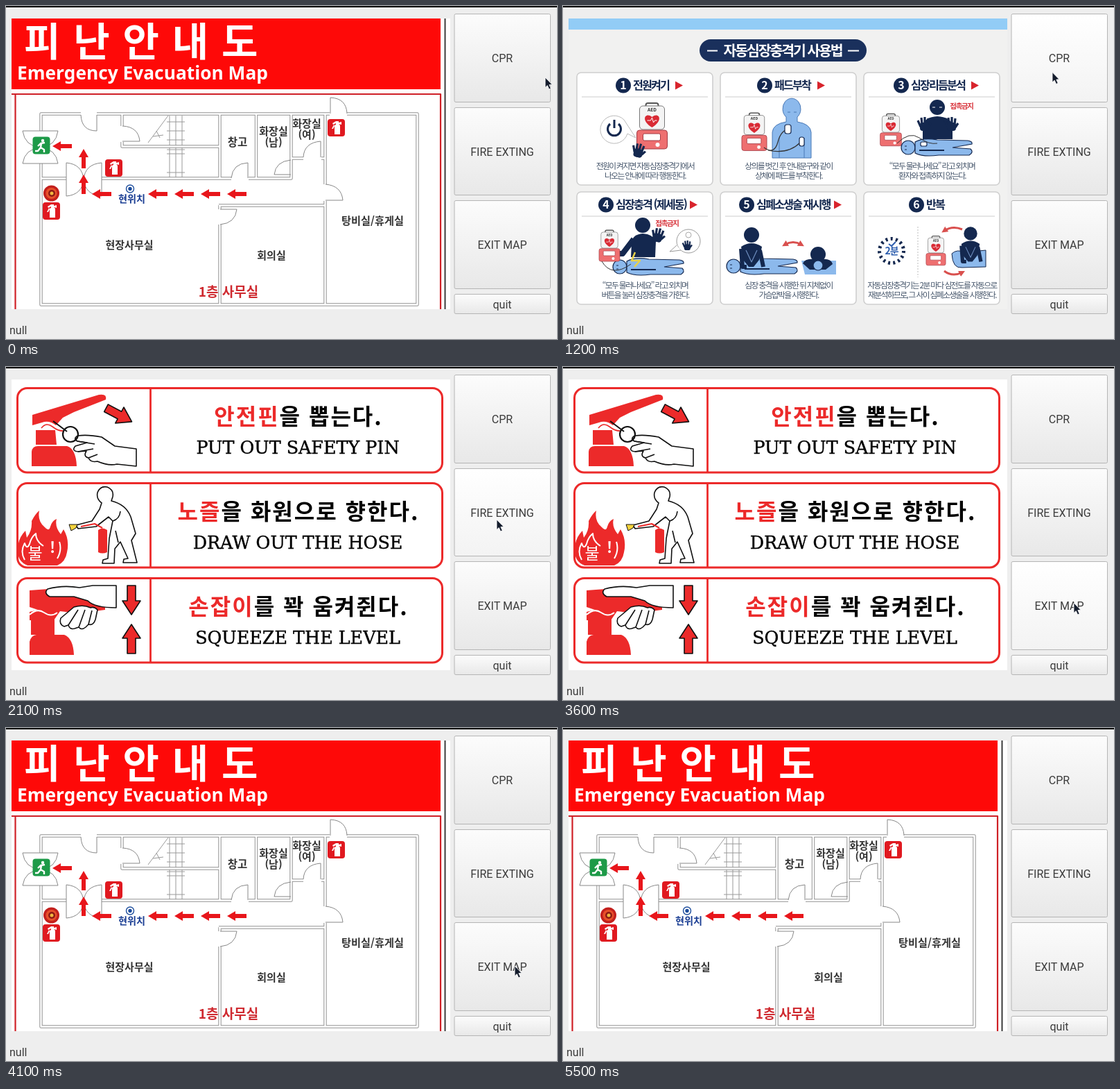
Write an HTML page that moves like this. It is 795 px wide and 480 px high and loops after 5.8 s.

```html
<!DOCTYPE html>
<html lang="ko">
<meta charset="utf-8">
<style>
html, body { margin: 0; width: 100%; height: 100%; overflow: hidden; background: #eee }
svg { display: block }
.ko { font-family: "Noto Sans CJK KR", "Noto Sans CJK JP", sans-serif; text-anchor: middle }
.ui { font: 16px Roboto, sans-serif; fill: #3c3c3c }
.serif { font: 25.4px "DejaVu Serif", serif; text-anchor: middle; stroke: #000; stroke-width: .4 }
</style>
<svg id="stage" width="795" height="480" viewBox="0 0 795 480"></svg>
<script>
const RED = '#ec2a2a', NAVY = '#14284f', SKY = '#8cb9ec';
const stage = document.getElementById('stage');

const path = (d, fill = 'none', stroke = 'none', width = 1) =>
  `<path d="${d}" fill="${fill}" stroke="${stroke}" stroke-width="${width}" stroke-linejoin="round"/>`;
const rect = (x, y, w, h, fill, rx = 0, more = '') =>
  `<rect x="${x}" y="${y}" width="${w}" height="${h}" rx="${rx}" fill="${fill}" ${more}/>`;
const circle = (x, y, r, fill, more = '') => `<circle cx="${x}" cy="${y}" r="${r}" fill="${fill}" ${more}/>`;
const text = (x, y, size, str, more = '') =>
  `<text x="${x}" y="${y + size * .37}" font-size="${size}" ${more}>${str}</text>`;
const at = (x, y, body, more = '') => `<g transform="translate(${x} ${y}) ${more}">${body}</g>`;

// Evacuation map
const doorArcs = 'M108 157Q109 180 131 180V157 M168 173Q191 174 193 195H168 M468 155V132Q491 133 492 155' +
  'M325 248Q327 227 349 226V248 M411 222Q389 224 387 243H411 M429 218Q430 197 454 195V218' +
  'M461 257Q484 259 486 280H461 M309 293H333Q331 313 309 315' +
  'M50 180H24Q27 202 50 204Q27 206 24 227H75Q72 206 50 204Q72 202 75 180Z' +
  'M87 226Q110 228 112 250Q110 272 87 274ZM138 226Q114 228 112 250Q114 272 138 274Z';
const walls = 'M108 155.5H50.5V180 M50.5 227V430.5H593.5V155.5H492 M131 155.5H467 M167.5 156V173' +
  'M167.5 196V202.5H308 M50 248.5H87 M138 248.5H325 M308.5 156V248 M350 248.5H411.5V219.5H429 M455 219.5H460' +
  'M361 156V248 M411.5 156V220 M460.5 156V257 M460.5 281V430 M460 287.5H307 M308.5 287V293 M308.5 315V430';
const stairs = 'M205 197L234 158 M217 180L222 190 M212 188L227 186 M236 158V247 M245 158V247 M254 158V247' +
  [167, 180, 193, 207, 213, 240].map(y => `M232 ${y}H258`).join('');
const mapArrow = (x, y, turn = 0) => at(x, y, path('M0 0L12-7V-3H28V3H12V7Z', '#e8161b'), `rotate(${turn})`);
const extinguisher = (x, y) => at(x, y, rect(0, 0, 25, 25, '#e01920', 4) +
  path('M10 10Q10 8 12 8V6L8 8L7 6L12 3H16V5L20 4V8L16 7Q18 8 18 10V22H10ZM9 8L6 14H8L10 10Z', '#fff'));
const map = rect(8, 18, 633, 419, '#fff') + rect(8, 18, 619, 102, '#fe0908') +
  path('M633.5 18V437', '', '#3a3a3a', 2) + path('M8 127H627V437M13.5 128V437', 'none', '#cf2027', 2.2) +
  `<text x="26" y="72" font-size="57" font-weight="700" letter-spacing="18.8" fill="#fff" text-anchor="start">피난안내도</text>
  <text x="16" y="106" font-size="26.3" font-weight="700" fill="#fff" text-anchor="start" font-family="Noto Sans, sans-serif">Emergency Evacuation Map</text>` +
  path(stairs, 'none', '#999') + path(walls, 'none', '#929292', 4.4) + path(walls, 'none', '#fff', 2.4) +
  path(doorArcs, 'none', '#888') +
  mapArrow(67, 202) + mapArrow(124, 271) + [205, 243, 281, 319].map(x => mapArrow(x, 271)).join('') +
  mapArrow(112, 206, 90) + mapArrow(112, 243, 90) +
  extinguisher(143, 221) + extinguisher(464, 163) + extinguisher(53, 283) +
  rect(38.5, 188.5, 25, 25, '#1d9a48', 4) + circle(53, 194, 2.2, '#fff') +
  path('M56 197L50 198L46 202M51 198L50 204L55 207V211M50 204L46 209H42', 'none', '#fff', 2.4) +
  circle(65.5, 270, 11.5, '#c3201d') + circle(65.5, 270, 8, '#e8502a') + circle(66, 270, 5, '#8c1a14') + circle(66, 270, 2.5, '#f0b840') +
  circle(179, 263.5, 5.5, '#fff', 'stroke="#1c4c9c" stroke-width="1.4"') + circle(179, 263.5, 2.7, '#1c4c9c') +
  `<g font-weight="700" fill="#333">` + text(334, 196, 15.5, '창고') + text(386, 180, 15, '화장실') + text(386, 196, 15, '(남)') +
  text(434, 169, 15, '화장실') + text(434, 185, 15, '(여)') + text(529, 309, 15.2, '탕비실/휴게실') +
  text(178, 344, 15, '현장사무실') + text(383, 359, 15, '회의실') +
  text(321, 412, 19, '1층 사무실', 'fill="#cf2a30"') + text(181.5, 278, 14.2, '현위치', 'fill="#1c3f94"') + '</g>';

// Defibrillator guide
const line = `stroke="${NAVY}" stroke-width="1.2"`;
const aed = (x, y, k) => at(x, y, rect(-9, -35, 18, 8, 'none', 3, 'stroke="#555" stroke-width="2"') +
  rect(-18, -31, 36, 34, '#f4f4f4', 5, 'stroke="#777"') + text(0, -25, 6.5, 'AED', 'fill="#333" font-weight="700"') +
  path('M0 0C-18-11-9-23 0-15C9-23 18-11 0 0Z', '#d92b35') + path('M-7-10H-2L0-14L2-7L4-10H7', 'none', '#fff') +
  rect(-22, 4, 44, 27, '#ee6f70', 4, 'stroke="#a33b45"') + rect(-13, 9, 25, 10, '#fff', 2, 'stroke="#a33b45"') +
  circle(8, 25, 3, '#fff'), `scale(${k})`);
const patient = (x, y) => at(x, y, `<g fill="${SKY}" ${line}>` +
  `<circle r="10"/><path d="M10-8Q22-15 42-11L86-10Q93-9 92-5L64 0L90 2Q95 7 88 11H44Q22 14 10 8Z"/><path d="M16 4H52" stroke-width="2"/></g>` +
  path('M-5-2H-2M-5 3H-2', 'none', NAVY));
const rescuer = (x, y, k = 1) => at(x, y, circle(0, 0, 11, NAVY) +
  path('M-15 17Q0 7 15 17L11 36L3 46H-4L-12 36Z', NAVY) + path('M-8 22L0 39L8 22', 'none', '#6f8fc0', 1.2) +
  path('M-15 20L-13 46H-7M12 22L17 46', 'none', NAVY, 6), `scale(${k})`);
const hand = (x, y, turn = 0) => at(x, y, path('M0 10V-2M-5 4L-9-5M-3 0L-4-9M1 0L1-10M5 1L6-8M6 5L10-1', 'none', NAVY, 3.2) +
  rect(-6, -2, 13, 12, NAVY, 4), `rotate(${turn})`);
const curve = (d, both = true) => `<path d="${d}" fill="none" stroke="#d9504e" stroke-width="3" marker-end="url(#tip)" ${both ? 'marker-start="url(#tip)"' : ''}/>`;
const noTouch = (x, y) => text(x, y, 10.5, '접촉금지', 'fill="#d8343c" font-weight="700" letter-spacing="-1.3"');
const cards = [
  ['전원켜기', 87, 162, '전원이 켜지면 자동심장충격기에서', '나오는 안내에 따라 행동한다.'],
  ['패드부착', 291, 367, '상의를 벗긴 후 안내문구와 같이', '상체에 패드를 부착한다.'],
  ['심장리듬분석', 488, 589, '“모두 물러나세요” 라고 외치며', '환자와 접촉하지 않는다.'],
  ['심장충격 (제세동)', 62, 183, '“모두 물러나세요” 라고 외치며', '버튼을 눌러 심장충격을 가한다.'],
  ['심폐소생술 재시행', 265, 391, '심장 충격을 시행한 뒤 지체없이', '가슴압박을 시행한다.'],
  ['반복', 510, 0, '자동심장충격기는 2분 마다 심전도를 자동으로', '재분석하므로, 그 사이 심폐소생술을 시행한다.'],
].map(([title, cx, tri, a, b], i) => {
  const x = 20 + i % 3 * 207, y = i < 3 ? 96 : 268, head = y + 18.5;
  const small = 'fill="#46566b" font-weight="500" letter-spacing="-1.65"';
  return rect(x, y, 196, 162, '#fff', 6, 'stroke="#cfcfcf" stroke-width="1.6"') +
    path(`M${x + 7} ${y + 35}h182`, 'none', '#ccc') + circle(cx, head, 11, NAVY) +
    text(cx, head, 16, i + 1, 'fill="#fff" font-weight="900"') +
    text(cx + 14, head, 16.2, title, `fill="${NAVY}" font-weight="700" letter-spacing="-1.9" text-anchor="start"`) +
    (tri ? path(`M${tri} ${head - 6}l11 6l-11 6Z`, '#d8242c') : '') +
    text(x + 98.5, y + 134.5, 11.8, a, small) + text(x + 98.5, y + 149, 11.8, b, small);
}).join('');
const guide = rect(8, 18, 633, 419, '#f1f1f0') + rect(8, 18, 633, 16, '#92ccf6') +
  rect(197, 48, 241, 32, '#1a305c', 16) + path('M208 64.5H223M411 64.5H427', 'none', '#fff', 2) +
  text(317, 64.5, 20.5, '자동심장충격기 사용법', 'fill="#fff" font-weight="700" letter-spacing="-2.1"') + cards +
  // 1: power on
  aed(128.5, 175, 1) + path('M88 164A20 20 0 1 0 93 184L105 190Z', '#fff', '#bbb') +
  path('M68 170A9.5 9.5 0 1 0 80 170M74 164V176', 'none', NAVY, 3) + hand(109, 208, 15) +
  // 2: pads
  aed(276, 183, .82) + path('M302 219V182Q303 170 322 167V160A13 15 0 1 1 338 160V167Q357 170 358 182V219Z', SKY, '#4978b5') +
  path('M312 219V190M348 219V190M324 153H328M333 153H337', 'none', '#4978b5') +
  path('M290 204Q305 215 310 196T328 178M296 208Q325 214 342 197', 'none', '#333', 1.2) +
  rect(320, 171, 9, 13, '#fff', 3, line) + rect(341, 189, 7, 13, '#fff', 3, line) +
  // 3: analysis
  aed(473, 180, .7) + circle(540, 146, 11, NAVY) + path('M519 192V172Q522 160 540 159Q559 160 562 172V192Z', NAVY) +
  hand(521, 170) + hand(560, 170) + path('M533 146H537M543 146H547', 'none', '#fff') +
  patient(498, 204) + path('M482 198Q500 180 514 190T540 198', 'none', '#333') + rect(516, 196, 9, 6, '#fff', 2, line) + noTouch(575, 144) +
  // 4: shock
  path('M98 362L99 340Q101 329 115 328Q130 329 134 339L133 362Z', NAVY) + circle(115, 316, 11, NAVY) +
  path('M102 336L86 357L74 357M130 338L137 330', 'none', NAVY, 8) + hand(137, 330, 15) + patient(82, 376) + aed(67, 347, .68) +
  path('M56 368Q70 392 98 372', 'none', '#333') + path('M104 355L99 367H111L103 376', 'none', '#e8d24a', 2.5) +
  circle(181, 339, 17, '#fff', 'stroke="#999"') + path('M164 345L154 354L170 352', '#fff', '#999') +
  circle(181, 330, 4, '#fff', 'stroke="#aaa"') + at(179, 345, hand(0, 0), 'scale(.7)') + noTouch(150, 313) +
  // 5: compressions
  patient(246, 375) + rescuer(272, 330) + curve('M320 344Q332 337 344 344') +
  path('M344 367H394V387H349Z', SKY) + circle(368, 358, 11, NAVY) + path('M346 371Q350 362 368 366Q386 362 389 372L379 380H356Z', NAVY) + circle(368, 374, 7, SKY, line) +
  // 6: repeat
  circle(474, 353, 17.5, 'none', `stroke="${NAVY}" stroke-width="5" stroke-dasharray="3 4.33"`) +
  text(474, 353, 14, '2분', `fill="#2d5eae" font-weight="700" letter-spacing="-1"`) +
  path('M470 343L474 346L480 340', 'none', '#2d5eae', 2) +
  `<path d="M512 318V391" stroke="#bbb" stroke-dasharray="2 2"/>` + aed(538, 354, .64) +
  path('M561 357Q568 350 580 355L610 352V376L576 377Q562 379 561 357Z', SKY, NAVY) + rescuer(588, 328, .88) +
  curve('M576 322Q562 316 550 324', false) + curve('M550 382Q562 391 576 384', false);

// Extinguisher instructions
const ink = (d, fill = '#fff', w = 1.6) => path(d, fill, '#111', w);
const bigArrow = (x, y, turn) => at(x, y, ink('M-6-21H6V1H13L0 21L-13 1H-6Z', RED), `rotate(${turn})`);
const rows = [
  ['안전핀', '을 뽑는다.', 'PUT OUT SAFETY PIN'],
  ['노즐', '을 화원으로 향한다.', 'DRAW OUT THE HOSE'],
  ['손잡이', '를 꽉 움켜쥔다.', 'SQUEEZE THE LEVEL'],
].map(([key, rest, english], i) => {
  const y = 30.5 + i * 137;
  return rect(16.5, y, 613, 121.5, '#fff', 14, `stroke="${RED}" stroke-width="3"`) + path(`M208.5 ${y}v122`, 'none', RED, 2.8) +
    `<text x="422" y="${y + 52}" font-size="32" font-weight="700" letter-spacing="2"><tspan fill="${RED}">${key}</tspan>${rest}</text>
    <text class="serif" x="421" y="${y + 94.5}">${english}</text>`;
}).join('');
const steps = rect(8, 18, 633, 419, '#fff') + rows +
  // 1: pin
  path('M38 69L134 40Q146 38 144 47L98 65L82 73L72 84Q62 76 52 80L38 84Z', RED) +
  path('M43 91H71L73 112H43ZM37 143V122Q38 114 46 114H88Q101 118 102 143Z', RED) + path('M51 88Q58 79 67 86T84 92', 'none', RED, 1.6) +
  ink('M68 78L88 93', 'none', 2) +
  ink('M188 118L157 114L138 101Q118 97 104 99Q96 103 103 107L117 109L100 114Q94 121 104 122L116 121Q111 129 119 131Q122 138 132 136Q148 143 160 140L188 143Z') +
  ink('M103 107L128 111M104 122L126 118M119 131L132 126', 'none') +
  circle(93, 97, 11, 'none', 'stroke="#111" stroke-width="2.2"') + bigArrow(163, 69, -62) +
  // 2: hose
  path('M31 286Q15 280 17 260Q18 246 28 236L30 246Q38 236 37 222Q42 212 48 207Q45 222 56 231Q62 238 64 230Q66 222 73 219Q70 230 79 241L83 234Q92 249 88 267Q86 281 74 286Z', RED) +
  path('M27 278Q20 266 27 254Q30 264 34 255Q36 246 43 240Q43 251 54 258M74 276Q81 264 77 252', 'none', '#fff', 2) +
  text(42, 268, 23, '불', 'fill="#fff" font-weight="500"') + text(67, 260, 22, '!', 'fill="#fff" font-weight="700"') +
  ink('M138 196Q130 190 132 181Q136 171 146 173Q156 177 154 187L152 193Q173 198 180 216L187 240L181 250L189 282H169L170 277L176 276L165 252L157 262L156 283H139L140 278L147 276L149 247L154 222L148 216L130 230L104 233L101 228L124 222L135 205Z') +
  ink('M154 222Q164 219 165 208M158 236L162 253', 'none') +
  path('M133 235Q139 230 146 235V267Q139 270 133 267Z', RED) + path('M139 232L128 226L108 230', 'none', RED, 2) + ink('M91 227L103 227L101 232L94 236Z', '#f5d33c', 1) +
  // 3: lever
  path('M34 322L61 320L143 343V350L104 355L78 352L69 365H34V353L46 350L34 346Z', RED) + path('M34 357Q45 347 55 354T74 354', 'none', '#fff', 2) +
  path('M36 364H70V386H36ZM34 415V396Q36 387 44 386H84Q97 391 98 415Z', RED) +
  ink('M159 315H125L106 318Q82 314 60 320Q54 326 63 331L98 331L118 337Q128 347 159 347Z') +
  ink('M98 346L79 362Q76 371 84 374L90 372Q92 379 99 377L105 375Q109 380 115 375L119 371Q126 373 129 364L132 350Q127 345 122 347Q112 342 98 346Z') +
  ink('M104 350L90 372M114 350L105 375M124 351L119 371', 'none') + bigArrow(181, 336, 0) + bigArrow(181, 392, 180);

const buttons = [['CPR', 11, 128], ['FIRE EXTING', 146, 127], ['EXIT MAP', 280, 128], ['quit', 415, 29]].map(([label, y, h]) =>
  rect(647, y + .5, 138.5, h - 1, 'url(#face)', 2, 'class="button" stroke="#b5b5b5"') +
  `<text class="ui" x="716" y="${y + h / 2 + 6}" text-anchor="middle">${label}</text>`).join('');
const shade = (id, top, bottom) =>
  `<linearGradient id="${id}" x2="0" y2="1"><stop stop-color="${top}"/><stop offset="1" stop-color="${bottom}"/></linearGradient>`;

stage.innerHTML = `<defs>${shade('face', '#fcfcfc', '#e8e8e8')}${shade('hover', '#fff', '#f3f3f3')}
  <marker id="tip" viewBox="0 0 8 8" refX="4" refY="4" markerWidth="3" markerHeight="3" orient="auto-start-reverse"><path d="M0 0L8 4L0 8Z" fill="#d9504e"/></marker>
  </defs>` + rect(0, 0, 795, 480, '#eee') + rect(0, 0, 795, 2, '#000') +
  [map, guide, steps].map(s => `<g class="scene ko">${s}</g>`).join('') + buttons +
  `<text class="ui" x="5" y="473">null</text>
  <g id="cursor"><path d="M0 0V14.5L3.2 11.6L5.6 17L8.2 15.8L5.8 10.6L10 10.3Z" fill="#141c2c" stroke="#fff" stroke-width=".8"/></g>`;

const scenes = stage.querySelectorAll('.scene'), faces = stage.querySelectorAll('.button');
const cursor = document.getElementById('cursor');
// Each entry holds its value from the given time on
const pointer = [[0, 778, 103], [100, 762, 104], [200, 742, 102], [300, 724, 100], [500, 711, 97], [1000, 706, 95.5],
  [1300, 708, 190], [1400, 708, 276], [1700, 708, 220], [2200, 710, 245], [2300, 717, 285], [2400, 726, 325],
  [3600, 737, 340], [3900, 734, 343], [4500, 732, 348], [4700, 710, 445], [4800, 719, 443], [5000, 719, 439],
  [5200, 560, 330], [5300, 335, 180], [5400, 106, 23], [5500, -50, -50]];
const shown = [[0, 0], [1200, 1], [2100, 2], [4100, 0]];
const hovered = [[0, -1], [1000, 0], [1300, -1], [1700, 1], [2300, 2], [4100, -1]];
const pressed = [[0, -1], [1100, 0], [1200, -1], [1800, 1], [2100, -1], [4000, 2], [4100, -1]];
const current = (keys, t) => keys.findLast(k => k[0] <= t).slice(1);

function draw() {
  const t = performance.now() % 5800;
  const [x, y] = current(pointer, t), [scene] = current(shown, t);
  const [over] = current(hovered, t), [down] = current(pressed, t);
  cursor.setAttribute('transform', `translate(${x} ${y})`);
  scenes.forEach((s, i) => s.style.display = i === scene ? '' : 'none');
  faces.forEach((f, i) => f.setAttribute('fill', i === down ? '#d8d8d8' : i === over ? 'url(#hover)' : 'url(#face)'));
  requestAnimationFrame(draw);
}
draw();
</script>
</html>
```
